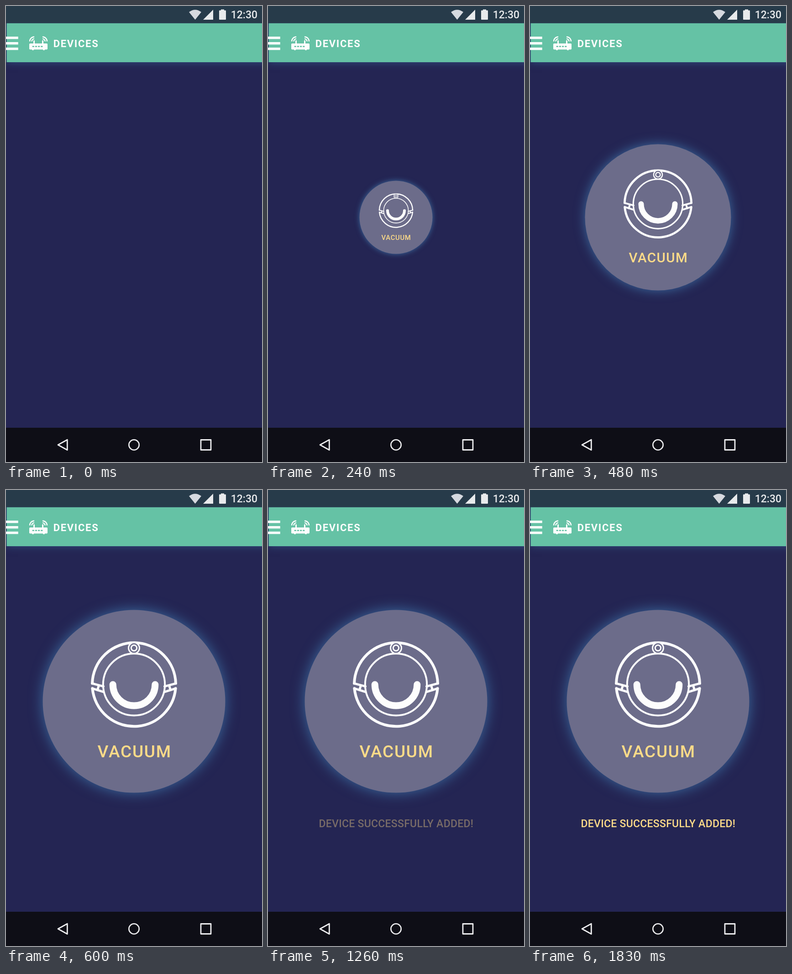
These frames come from a looping animation (561 by 998 pixels, 9 s). An HTML page with a canvas:

```html
<!DOCTYPE html>
<html lang="en">
<head>
<meta charset="utf-8">
<title>Devices</title>
<style>
html, body { margin: 0; width: 100%; height: 100%; overflow: hidden; background: #242553; }
canvas { display: block; width: 561px; height: 998px; }
</style>
</head>
<body>
<canvas id="stage"></canvas>
<script>
const W = 561, H = 998, LOOP = 9000, STEP = 30;
const NAVY = '#242553', GREEN = '#65c2a5', DISC = '#6c6c8a', GOLD = '#fddb88', WHITE = '#fdfdfd';
const FONT = 'Roboto, sans-serif';
const canvas = document.getElementById('stage');
const ctx = canvas.getContext('2d');
const dpr = window.devicePixelRatio || 1;
canvas.width = W * dpr;
canvas.height = H * dpr;

const clamp = v => Math.max(0, Math.min(1, v));

function rect(x, y, w, h, color, r = 0) {
  ctx.fillStyle = color;
  ctx.beginPath();
  ctx.roundRect(x, y, w, h, r);
  ctx.fill();
}

function poly(points) {
  ctx.beginPath();
  points.forEach(([x, y]) => ctx.lineTo(x, y));
  ctx.closePath();
}

function arc(x, y, r, width, from = 0, to = Math.PI * 2) {
  ctx.lineWidth = width;
  ctx.beginPath();
  ctx.arc(x, y, r, from, to);
  ctx.stroke();
}

function text(str, x, y, size, weight, color, spacing = 0) {
  ctx.font = `${weight} ${size}px ${FONT}`;
  ctx.letterSpacing = spacing + 'px';
  ctx.fillStyle = color;
  ctx.fillText(str, x, y);
}

// Shadow blur ignores the transform, so it is scaled here
function glow(blur, alpha) {
  ctx.shadowColor = `rgba(64, 118, 170, ${alpha})`;
  ctx.shadowBlur = blur * dpr;
}

function statusBar() {
  rect(0, 0, W, 37.5, '#273b4a');
  ctx.fillStyle = '#d6d9df';
  ctx.beginPath();
  ctx.moveTo(414.5, 30);
  ctx.lineTo(401, 13.3);
  ctx.quadraticCurveTo(414.5, 3, 428, 13.3);
  ctx.fill();
  ctx.fillStyle = '#e8eaec';
  poly([[432, 30], [454, 30], [454, 8]]);
  ctx.fill();
  rect(467, 9.5, 15, 20.5, '#e8eaec', 1.2);
  rect(471, 7.5, 7, 4, '#e8eaec');
  text('12:30', 492.7, 27, 23, 500, '#e8eaec');
}

function router() {
  rect(51, 82, 40, 13.3, WHITE, 2);
  for (const x of [57, 81]) rect(x, 94, 4, 2.8, WHITE, 1);
  for (let i = 0; i < 4; i++) rect(57.5 + i * 6.2, 87.2, 4.4, 2.8, GREEN, 1.2);
  ctx.strokeStyle = WHITE;
  ctx.lineCap = 'butt';
  for (const side of [-1, 1]) {
    ctx.save();
    ctx.translate(71, 0);
    ctx.scale(side, 1);
    rect(8, 75, 3, 8, WHITE, 1.4);
    arc(9, 77.5, 10, 2.4, -Math.PI / 2, 0);
    arc(9, 77.5, 5.6, 2.4, -Math.PI / 2, 0);
    ctx.restore();
  }
}

function header() {
  glow(16, 0.55);
  rect(1.5, 37.5, W + 20, 85.5, GREEN);
  ctx.shadowColor = 'transparent';
  for (const y of [67, 79, 91]) rect(0, y, 26.7, 5.3, WHITE);
  router();
  text('DEVICES', 103.7, 90.2, 22, 700, WHITE, 1.7);
}

function navBar() {
  rect(0, 923, W, 75, '#0e0e16');
  ctx.strokeStyle = '#ececee';
  ctx.lineJoin = 'round';
  ctx.lineWidth = 2.8;
  poly([[114, 960.5], [134.3, 949.2], [134.3, 971.8]]);
  ctx.stroke();
  arc(280.5, 960.5, 11.2, 2.6);
  ctx.lineWidth = 2.8;
  ctx.strokeRect(427, 949.5, 22, 22);
}

// Half of the robot's shell: thick rim with slanted ends reaching the inner ring
function shell(y, innerY, over) {
  const r = 91.5, a = Math.asin(y / r);
  ctx.lineWidth = 6;
  ctx.beginPath();
  ctx.arc(0, 0, r, Math.PI - a, a, !over);
  ctx.stroke();
  ctx.lineWidth = 5;
  for (const s of [-1, 1]) {
    ctx.beginPath();
    ctx.moveTo(s * r * Math.cos(a), y);
    ctx.lineTo(s * 67, innerY);
    ctx.stroke();
  }
}

function robot() {
  ctx.strokeStyle = WHITE;
  ctx.lineCap = ctx.lineJoin = 'round';
  shell(-2.5, 4, true);
  shell(8.5, 16, false);
  for (const s of [-1, 1]) {
    ctx.lineWidth = 5;
    ctx.beginPath();
    ctx.moveTo(s * 77, 2);
    ctx.lineTo(s * 80, 12);
    ctx.stroke();
  }
  arc(0, 0, 67.7, 4);
  ctx.fillStyle = DISC;
  ctx.beginPath();
  ctx.arc(0, -80, 12, 0, Math.PI * 2);
  ctx.fill();
  arc(0, -80, 12, 3);
  arc(0, -80, 6.2, 3);
  arc(0, 0, 46.3, 15, 0, Math.PI);
}

function device(scale) {
  if (!scale) return;
  ctx.save();
  ctx.translate(280.5, 462.5);
  ctx.scale(scale, scale);
  glow(30 * scale, 0.85);
  ctx.fillStyle = DISC;
  ctx.beginPath();
  ctx.arc(0, 0, 200, 0, Math.PI * 2);
  ctx.fill();
  ctx.shadowColor = 'transparent';
  text('VACUUM', -80, 122.5, 37, 500, GOLD, 1.8);
  ctx.translate(0, -36.7);
  robot();
  ctx.restore();
}

function draw(t) {
  ctx.setTransform(dpr, 0, 0, dpr, 0, 0);
  rect(0, 0, W, H, NAVY);
  header();
  statusBar();
  navBar();
  device(clamp(t / 600));
  ctx.globalAlpha = clamp((t - 900) / 930);
  text('DEVICE SUCCESSFULLY ADDED!', 111.4, 738, 23, 500, GOLD, 0.28);
  ctx.globalAlpha = 1;
}

function tick() {
  const t = performance.now() % LOOP;
  draw(Math.floor(t / STEP) * STEP);
  requestAnimationFrame(tick);
}
tick();
</script>
</body>
</html>
```
